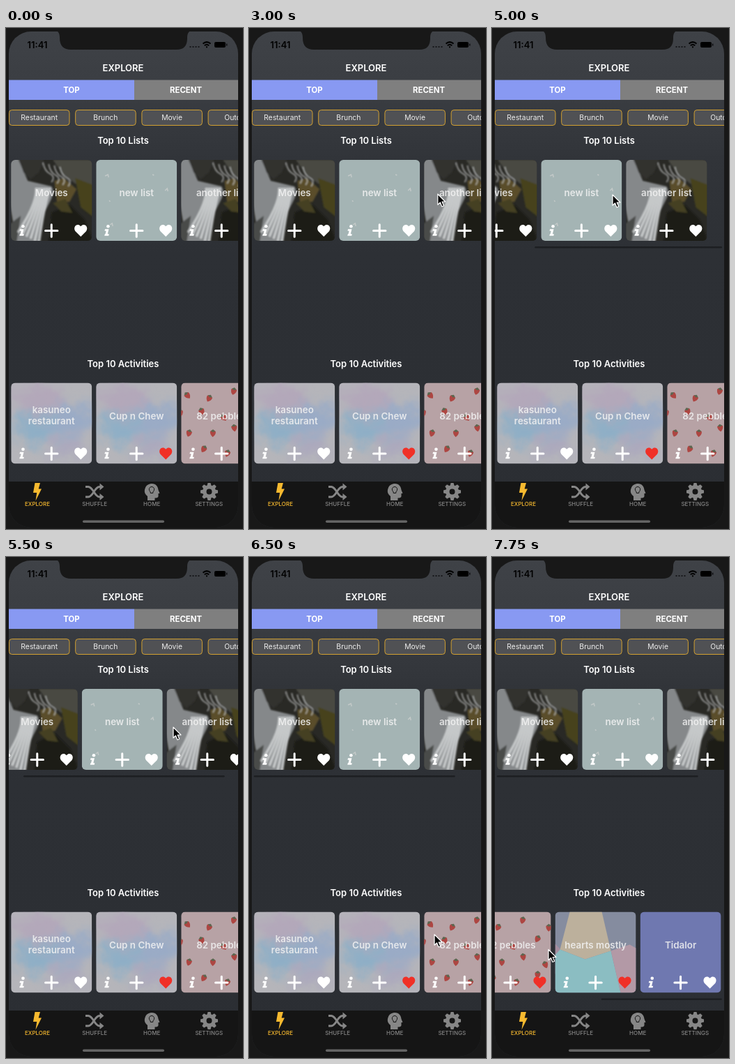
Write an HTML page that moves like this. It is 340 px wide and 718 px high and loops after 8 s.

```html
<!DOCTYPE html>
<html lang="en">
<head>
<meta charset="utf-8">
<title>Explore</title>
<style>
  html, body { margin: 0; width: 100%; height: 100%; overflow: hidden; background: #181818; }
  svg { display: block; }
  text { font-family: Inter, Roboto, sans-serif; text-anchor: middle; fill: #fff; }
  .head { font-size: 13px; font-weight: 600; }
  .seg { font-size: 11.4px; font-weight: 700; }
  .chip { font-size: 10.4px; fill: #ececec; }
  .title { font-size: 13.4px; font-weight: 600; fill: #f2f2f2; fill-opacity: .85; }
  .tab { font-size: 8px; font-weight: 500; fill: #868686; }
  .on { fill: #f6b92f; }
</style>
</head>
<body>
<svg id="stage" width="340" height="718" viewBox="0 0 340 718">
  <defs>
    <linearGradient id="bg" x2="0" y2="1">
      <stop stop-color="#3f4247"/><stop offset=".12" stop-color="#3a3d42"/>
      <stop offset=".26" stop-color="#313439"/><stop offset=".45" stop-color="#2d3035"/>
      <stop offset="1" stop-color="#2b2e33"/>
    </linearGradient>
    <clipPath id="screen"><rect x="4" y="5" width="329" height="711" rx="32"/></clipPath>
    <clipPath id="card"><rect width="116" height="116" rx="6"/></clipPath>
    <filter id="soft" x="-20%" y="-20%" width="140%" height="140%"><feGaussianBlur stdDeviation="1"/></filter>
    <filter id="wash" x="-30%" y="-30%" width="160%" height="160%">
      <feGaussianBlur stdDeviation="9" result="blur"/>
      <feTurbulence type="fractalNoise" baseFrequency=".04" numOctaves="4" seed="4"/>
      <feDisplacementMap in="blur" scale="34" xChannelSelector="R" yChannelSelector="G"/>
    </filter>

    <g id="waterfall">
      <rect width="116" height="116" fill="#292925"/>
      <g filter="url(#soft)">
        <path d="M60 0H118V40L92 34 74 20Z" fill="#484943"/>
        <path d="M62 30L76 26 94 42 84 60 66 62Z" fill="#5a4e2b"/>
        <path d="M92 26L118 36V82L100 68Z" fill="#46421f"/>
        <path d="M58 76L84 64 106 86 118 118H54Z" fill="#1c1d19"/>
        <path d="M60 62L78 56 88 76 72 74Z" fill="#454122"/>
        <path d="M-2 -2H10L24 30 58 38C66 50 52 62 46 82L40 118H8L-2 62Z" fill="#85888a"/>
        <path d="M11 -2H48L40 18 28 28 18 18Z" fill="#33322e"/>
        <path d="M-2 92L14 80 8 118H-2Z" fill="#4a4b4a"/>
        <g id="strands" fill="none" stroke="#d9dbdc" stroke-width="3.4" stroke-opacity=".8"></g>
      </g>
    </g>
    <g id="pale">
      <rect width="116" height="116" fill="#a4b4b4"/>
      <path d="M13 23l4-2 1 4M99 44l3-3 1 4M20 93l3-2 1 4M81 21l2 1M19 58l1 2" fill="none" stroke="#c3c9c8" stroke-width="1.5"/>
    </g>
    <g id="watercolor">
      <rect width="116" height="116" fill="#b5b5ba"/>
      <g filter="url(#wash)">
        <ellipse cx="40" cy="24" rx="40" ry="18" fill="#b3a7ba"/>
        <ellipse cx="36" cy="64" rx="36" ry="22" fill="#8fafc6"/>
        <ellipse cx="86" cy="52" rx="30" ry="24" fill="#9aabc6"/>
        <ellipse cx="82" cy="92" rx="32" ry="14" fill="#aba8bd"/>
      </g>
    </g>
    <g id="berry">
      <path d="M-4-2.5Q0-5 4-2.5Q4.5 2 0 5.5Q-4.5 2-4-2.5Z" fill="#ad4642"/>
      <path d="M-3.5-3L0-5.5 3.5-3 0-1.5Z" fill="#5d6650"/>
    </g>
    <g id="berries"><rect width="116" height="116" fill="#b7a2a5"/></g>
    <g id="facets">
      <rect width="116" height="116" fill="#858c9f"/>
      <path d="M0 46L8 54 0 90Z" fill="#a58e9f"/>
      <path d="M21 0H67L80 56 43 68 7 54Z" fill="#bcb09c"/>
      <path d="M0 62L7 54 43 68 80 56 94 116H0Z" fill="#8bbdc2"/>
      <path d="M80 56L107 47 116 52V116H94Z" fill="#b399a6"/>
    </g>
    <rect id="plain" width="116" height="116" fill="#6f78b0"/>

    <g id="info" fill="#fff">
      <circle cx="17.2" cy="95.3" r="2.3"/>
      <path d="M12.8 99.3H18.2L16.5 106.2H18.6L18 108.8H12L12.6 106.2H13.3L14.4 101.7H12.2Z"/>
    </g>
    <path id="plus" d="M58 92.8V110.2M49.3 101.5H66.7" stroke="#fff" stroke-width="3" stroke-linecap="round"/>
    <path id="heart" d="M100 110L92.2 102.2C88.2 97 94.4 89.4 100 95.2C105.6 89.4 111.8 97 107.8 102.2Z"/>
  </defs>

  <rect width="340" height="718" fill="#181818"/>
  <g clip-path="url(#screen)">
    <rect x="4" y="5" width="329" height="711" fill="url(#bg)"/>
    <path d="M68 0C75 5 77 7 77 14C77 26 83 31 93 31H245C255 31 260 26 260 14C260 7 262 5 270 0Z" fill="#181818"/>

    <text x="45" y="28.5" style="font-size:13px;font-weight:600;fill:#000">11:41</text>
    <path d="M263.5 27h14" stroke="#16171a" stroke-width="2" stroke-dasharray="2 2"/>
    <path d="M282.5 22.5Q288 17.8 293.5 22.5M284.8 25.2Q288 22.4 291.2 25.2M287 27.3h2" fill="none" stroke="#000" stroke-width="2"/>
    <rect x="299" y="20" width="16" height="8" rx="2"/>
    <path d="M316.7 22.5v3" stroke="#000" stroke-width="1.2"/>

    <text class="head" x="168" y="62">EXPLORE</text>
    <rect x="4" y="74.5" width="180" height="28.5" fill="#8899f2"/>
    <rect x="184" y="74.5" width="149" height="28.5" fill="#7f7f7f"/>
    <text class="seg" x="94" y="93">TOP</text>
    <text class="seg" x="258" y="93">RECENT</text>
    <g id="chips"></g>

    <text class="head" x="168" y="166">Top 10 Lists</text>
    <text class="head" x="168" y="486">Top 10 Activities</text>
    <g id="rows"></g>

    <rect x="4" y="650" width="329" height="66" fill="#151515"/>
    <path d="M41.5 652H49L46.7 660.5H51L42.5 677.5L44.2 666H39Z" fill="#f6b92f"/>
    <path d="M114 657.5h4c7 0 9 14.5 16 14.5h2M114 672h4c7 0 9-14.5 16-14.5h2" fill="none" stroke="#868686" stroke-width="3"/>
    <path d="M134.5 652.5l6 5-6 5zM134.5 667l6 5-6 5z" fill="#868686"/>
    <path d="M203 677V671C199 668 198 664 199.5 660C201 655 205 653 209.5 653C215 653 218 657 218.5 662L220.5 667H218.5V671C218.5 673 216.5 673.5 213.5 673.5V677Z" fill="#868686"/>
    <path d="M207.2 666.5V665C203.5 661 206 657.5 209 657.5S214.500 661 210.800 665V666.500Z" fill="none" stroke="#151515"/>
    <circle cx="291.5" cy="664.5" r="6.7" fill="none" stroke="#868686" stroke-width="5.4"/>
    <g id="teeth" fill="#868686"></g>
    <g id="tabs"></g>
    <rect x="110" y="705.5" width="117" height="3.5" rx="1.7" fill="#646464"/>
  </g>
  <path id="cursor" d="M0 0V15.2L3.5 12 6 18 8.7 16.8 6.2 11H11Z" stroke="#fff" stroke-width="1.2" stroke-linejoin="round"/>
</svg>
<script>
const $ = id => document.getElementById(id);
const STEP = 250, LOOP = 8000, PITCH = 122, TRACK = 323, VIEW = 327;
const clamp = (v, low, high) => Math.min(high, Math.max(low, v));
const repeat = (count, draw) => Array.from({ length: count }, (_, i) => draw(i)).join('');

// Water fanning out to the lower left, and thin streams over the rocks above it.
$('strands').innerHTML = repeat(6, i =>
  `<path d="M${36 + 4 * i} 40Q${38 + 2 * i} 62 ${10 + 6 * i} ${104 + 3 * i}"/>`) + repeat(4, i =>
  `<path d="M${46 + 8 * i} ${4 + 2 * i}q2 12 10 16t2 12" stroke-width="1.8" stroke-opacity=".6"/>`);

// Staggered lattice of berries, each nudged and turned a little.
$('berries').innerHTML += repeat(16, i => {
  const row = i >> 2, col = i % 4;
  const x = 9 + 34 * col - 13 * (row % 2) + 3 * Math.sin(i * 5);
  const y = 18 + 26 * row + 6 * Math.sin(i * 2.4);
  return `<use href="#berry" transform="translate(${x} ${y}) rotate(${i * 67 % 80 - 40})"/>`;
});

$('chips').innerHTML = ['Restaurant', 'Brunch', 'Movie', 'Outdoor'].map((name, i) => {
  const x = 4.5 + 95.2 * i;
  return `<rect x="${x}" y="117.5" width="86.5" height="22" rx="4" fill="#505154" stroke="#d2a031"/>
    <text class="chip" x="${x + 43.2}" y="132.3">${name}</text>`;
}).join('');

$('teeth').innerHTML = repeat(8, i =>
  `<path d="M288.5 656L289.5 652H293.5L294.5 656Z" transform="rotate(${i * 45} 291.5 664.5)"/>`);

$('tabs').innerHTML = ['EXPLORE', 'SHUFFLE', 'HOME', 'SETTINGS'].map((name, i) =>
  `<text class="tab ${i ? '' : 'on'}" x="${45 + 82.1 * i}" y="685">${name}</text>`).join('');

function cardMarkup([title, art, liked], i) {
  const lines = title.split('|');
  const base = lines.length > 1 ? 43.5 : 52;
  const words = lines.map((line, n) => `<text class="title" x="58" y="${base + 15.5 * n}">${line}</text>`);
  return `<g transform="translate(${PITCH * i})">
    <g clip-path="url(#card)"><use href="#${art}"/></g>${words.join('')}
    <use href="#info"/><use href="#plus"/><use href="#heart" fill="${liked ? '#f03027' : '#fff'}"/></g>`;
}

// A horizontal list whose indicator shrinks when pulled past an end.
function makeRow(id, y, cards) {
  $('rows').innerHTML += `<g id="${id}">${cards.map(cardMarkup).join('')}</g>
    <rect id="${id}Bar" y="${y + 124}" height="2.4" rx="1.2" fill="#1d1f22"/>`;
  const max = PITCH * cards.length - VIEW;
  const length = TRACK * VIEW / (max + VIEW);
  const show = (offset, barShown) => {
    $(id).setAttribute('transform', `translate(${7.25 - offset} ${y})`);
    const inside = clamp(offset, 0, max);
    const over = Math.abs(offset - inside);
    const bar = $(id + 'Bar');
    bar.setAttribute('x', 7 + inside / max * (TRACK - length) + (offset > max ? over : 0));
    bar.setAttribute('width', length - over);
    bar.style.display = barShown ? '' : 'none';
  };
  return { max, show };
}

const lists = makeRow('lists', 189, [
  ['Movies', 'waterfall'], ['new list', 'pale'], ['another list', 'waterfall']]);
const activities = makeRow('activities', 508.5, [
  ['kasuneo|restaurant', 'watercolor'], ['Cup n Chew', 'watercolor', true],
  ['82 pebbles', 'berries', true], ['hearts mostly', 'facets', true], ['Tidalor', 'plain']]);

// Key points of the cursor: time, x, y
const path = [[1000, 208, 203], [1750, 262, 239], [2000, 270, 238], [3250, 271, 238], [4000, 238, 238],
  [4500, 174, 239], [5000, 173, 239], [5500, 240, 244], [6000, 256, 484], [6500, 266, 541],
  [7000, 137, 536], [7500, 81, 562], [LOOP, 81, 563]];

function cursorAt(time) {
  const next = clamp(path.findIndex(p => p[0] > time), 1, path.length - 1);
  const [a, b] = [path[next - 1], path[next]];
  const mix = clamp((time - a[0]) / (b[0] - a[0]), 0, 1);
  return [1, 2].map(n => a[n] + (b[n] - a[n]) * mix);
}

// Content follows the cursor one to one, then resists past its end.
function drag(row, grabX, time) {
  const pull = Math.max(0, grabX - cursorAt(time)[0]);
  return pull > row.max ? row.max + .41 * (pull - row.max) : pull;
}

function listsOffset(time) {
  const grab = 3250, release = 5500, after = time - release;
  if (time <= grab) return 0;
  if (after <= 0) return drag(lists, 260.5, time);
  return drag(lists, 260.5, release) * Math.exp(-after / 180) * Math.cos(after / 200);
}

function activitiesOffset(time) {
  const grab = 6500, release = 7000, after = time - release;
  if (time <= grab) return 0;
  if (after <= 0) return drag(activities, 256.7, time);
  const left = activities.max - drag(activities, 256.7, release);
  return activities.max - left * Math.exp(-((after / 300) ** 2));
}

function render(time) {
  $('cursor').style.display = time < path[0][0] ? 'none' : '';
  $('cursor').setAttribute('transform', `translate(${cursorAt(time)})`);
  lists.show(listsOffset(time), time >= 3750);
  activities.show(activitiesOffset(time), time >= 6750);
}

const start = performance.now();
function tick() {
  const elapsed = (performance.now() - start) % LOOP;
  render(Math.floor(elapsed / STEP) * STEP);
  requestAnimationFrame(tick);
}
tick();
</script>
</body>
</html>
```
